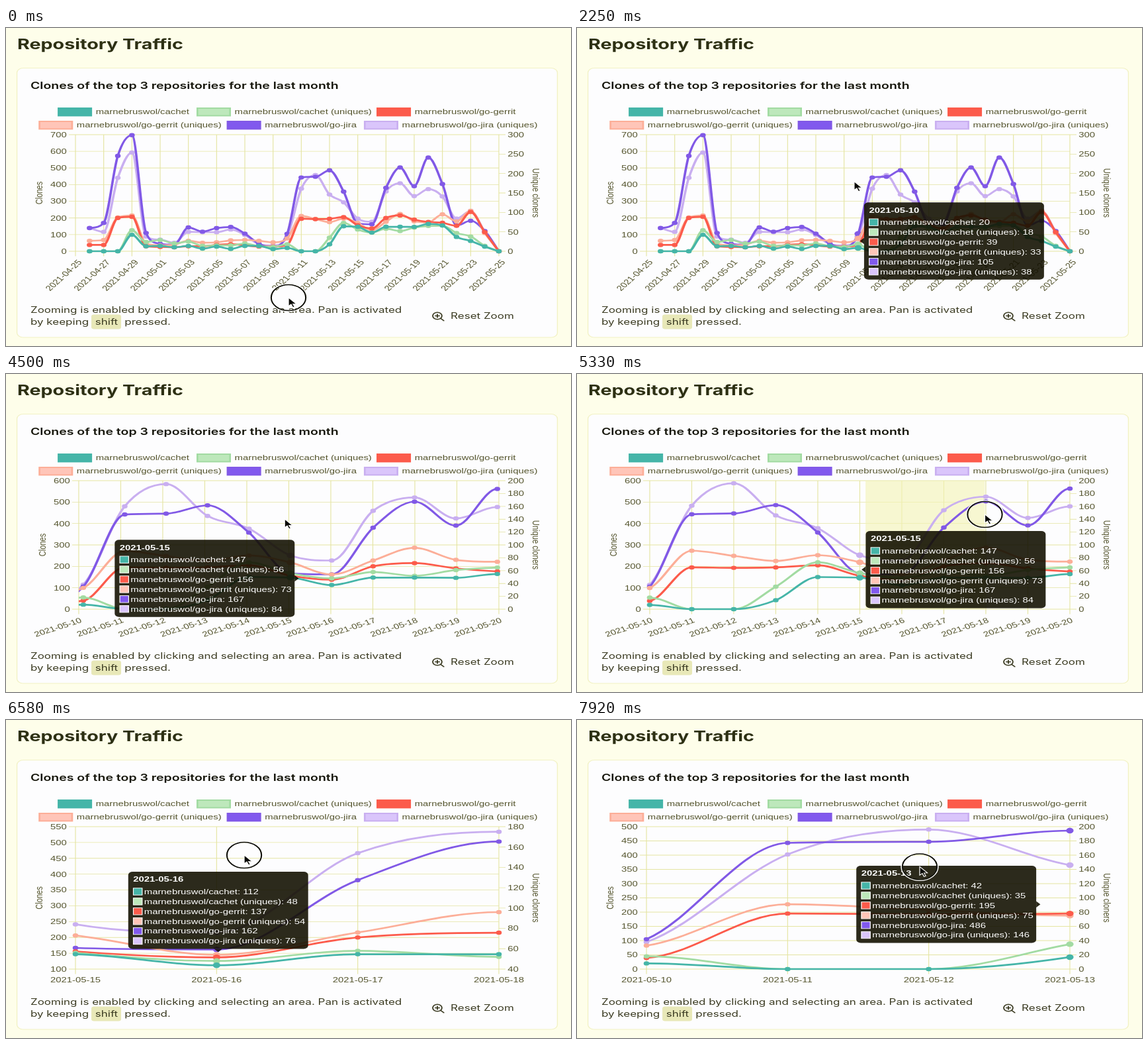
Animation of 854x480 px, one loop 8 s. Source, as an HTML page:

```html
<!DOCTYPE html>
<html lang="en">
<head>
<meta charset="utf-8">
<title>Repository Traffic</title>
<style>
  html, body { margin: 0; width: 100%; height: 100%; overflow: hidden; background: #fefeea; }
  svg { display: block; width: 100vw; height: 100vh; }
  text { white-space: pre; }
  .ui { font-family: Inter, sans-serif; font-size: 12.75px; fill: #3b3b22; }
  .ui .title { font-size: 21.5px; font-weight: 700; fill: #2d3014; }
  .ui .head { font-size: 14.6px; font-weight: 600; fill: #15150a; }
  .chart { font-family: "Liberation Sans", Arial, sans-serif; font-size: 11.15px; fill: #55552e; }
  .grid { stroke: #e5e5a2; stroke-width: .85; fill: none; }
  .tip { fill: #fff; }
</style>
</head>
<body>
<!-- The whole scene is 4:3 and shown on a wider stage. -->
<svg viewBox="0 0 640 480" preserveAspectRatio="none">
  <defs><clipPath id="area"><rect id="clip"/></clipPath></defs>
  <rect width="640" height="480" fill="#fefeea"/>
  <rect x="12.4" y="60.5" width="612.2" height="406.5" rx="7" fill="#fdfdfe" stroke="#f2f2c4"/>
  <g class="ui">
    <text class="title" x="12.7" y="32">Repository Traffic</text>
    <text class="head" x="27.7" y="92">Clones of the top 3 repositories for the last month</text>
    <text x="27.7" y="430">Zooming is enabled by clicking and selecting an area. Pan is activated</text>
    <text x="27.7" y="448">by keeping</text>
    <rect x="96.7" y="432.5" width="33.7" height="22" rx="3" fill="#e8e8b8"/>
    <text x="101" y="448">shift</text>
    <text x="134.4" y="448">pressed.</text>
    <text x="503.7" y="439">Reset Zoom</text>
    <g fill="none" stroke="#3b3b22" stroke-width="1.4" stroke-linecap="round">
      <circle cx="488.6" cy="434.5" r="5.2"/>
      <path d="M492.5 438.4l3.4 3.4M486.2 434.5h4.8M488.6 432.1v4.8"/>
    </g>
  </g>
  <g id="legend" class="chart"></g>
  <g id="chart" class="chart"></g>
  <g id="pointer"></g>
</svg>
<script>
const $ = id => document.getElementById(id);
const LOOP = 8000, FPS = 12, TOP = 161, RIGHT = 558.3, TIP_W = 203.8, TIP_H = 116.5;
const OWNER = 'marnebruswol/';

// Daily values, 26 April to 24 May; the last day is always 0.
const cachet = [0, 0, 0, 99, 30, 32, 24, 32, 16, 28, 14, 32, 32, 13, 20, 0, 0, 42, 150, 147, 112, 147, 147, 146, 164, 155, 86, 62, 28];
const cachetU = [0, 0, 0, 54, 24, 29, 20, 25, 14, 15, 15, 20, 13, 11, 18, 0, 0, 35, 73, 56, 48, 58, 52, 61, 65, 66, 47, 38, 14];
const gerrit = [38, 38, 200, 207, 30, 26, 24, 30, 30, 38, 42, 36, 28, 28, 39, 195, 193, 195, 205, 156, 137, 200, 215, 190, 176, 171, 153, 236, 115];
const gerritU = [27, 29, 87, 92, 20, 15, 17, 27, 22, 23, 28, 29, 27, 23, 33, 91, 83, 75, 84, 73, 54, 76, 96, 77, 74, 95, 77, 104, 47];
const jira = [139, 170, 573, 697, 110, 45, 40, 143, 118, 139, 146, 106, 45, 24, 105, 443, 447, 486, 358, 167, 162, 381, 503, 391, 563, 404, 155, 183, 122];
const jiraU = [60, 50, 189, 254, 38, 30, 22, 50, 49, 49, 56, 42, 18, 15, 38, 161, 196, 146, 126, 84, 76, 154, 175, 142, 160, 141, 84, 104, 50];

const makeSeries = (name, data, unique, color, fill, x, y) =>
  ({ name: OWNER + name, values: [null, ...data, 0], axis: unique ? 'r' : 'l', color, fill, x, y });
const series = [
  makeSeries('cachet', cachet, false, '#45b5a8', '#45b5a8', 58.5, 120),
  makeSeries('cachet (uniques)', cachetU, true, '#a2dba2', '#bde8bb', 215.8, 120),
  makeSeries('go-gerrit', gerrit, false, '#fc5b4b', '#fc5b4b', 419.7, 120),
  makeSeries('go-gerrit (uniques)', gerritU, true, '#fcae98', '#ffc5b8', 36.9, 140),
  makeSeries('go-jira', jira, false, '#8159e6', '#8159ee', 250, 140),
  makeSeries('go-jira (uniques)', jiraU, true, '#c9aff0', '#dac5fb', 405.4, 140)
];

const clamp = p => Math.min(1, Math.max(0, p));
const mix = (a, b, p) => a + (b - a) * p;
const outQuart = p => 1 - (1 - clamp(p)) ** 4;
const smooth = p => p * p * (3 - 2 * p);
const day = i => new Date(Date.UTC(2021, 3, 25 + i)).toISOString().slice(0, 10);
const text = (x, y, s, extra = '') => `<text x="${x}" y="${y}" ${extra}>${s}</text>`;
const END = 'text-anchor="end"', MID = 'text-anchor="middle"';

function niceScale(values) {
  const lo = Math.min(...values), hi = Math.max(...values);
  const raw = (hi - lo) / 10, base = 10 ** Math.floor(Math.log10(raw));
  const step = base * [1, 2, 5, 10].find(m => m * base >= raw);
  return { lo: Math.floor(lo / step) * step, hi: Math.ceil(hi / step) * step, step };
}

function makeView([start, a, b, animated]) {
  const n = b - a, rot = n > 10 ? 50 : n > 3 ? 23 : 0;
  const left = rot === 23 ? 82.4 : 78.7, bottom = { 0: 376, 23: 355, 50: 337 }[rot];
  const scaleFor = axis => niceScale(series.filter(s => s.axis === axis)
    .flatMap(s => s.values.slice(a, b + 1)).filter(v => v !== null));
  const axes = { l: scaleFor('l'), r: scaleFor('r') };
  const x = i => mix(left, RIGHT, (i - a) / n);
  const y = (v, axis) => mix(bottom, TOP, (v - axes[axis].lo) / (axes[axis].hi - axes[axis].lo));
  return { start, a, b, animated, rot, left, bottom, axes, x, y };
}

// Start time, first day, last day, animated change.
const views = [
  [0, 0, 30, false], [3885, 15, 25, true], [5500, 20, 23, true], [6900, 19, 22, false],
  [7120, 18, 21, false], [7290, 17, 20, false], [7480, 16, 19, false], [7785, 15, 18, false]
].map(makeView);

// Time, hovered day, vertical shift.
const hovers = [
  [800, 14], [1900, 15], [3960, 23], [4080, 22], [4200, 21], [4300, 20, 14], [4660, 20], [4780, 20],
  [5560, 22], [6345, 21], [6900, 21], [6990, 20], [7120, 20], [7210, 19], [7290, 19], [7480, 19],
  [7570, 18], [7785, 18]
];

const moves = [
  [0, 320, 407], [300, 320, 407], [1050, 313, 226], [1900, 313, 227], [2300, 314, 232], [2500, 314, 232],
  [3860, 476, 229], [3885, 476, 229], [4480, 315.5, 219], [4780, 326.8, 217], [5320, 462, 212],
  [5900, 462, 212], [6500, 269.8, 204], [6600, 269.8, 204], [7920, 388.2, 221.5], [LOOP, 388.2, 221.5]
];
// Start, end, selects an area.
const presses = [[0, 200], [2300, 3885, true], [4780, 5500, true], [6480, LOOP]];

const viewIndex = t => views.findLastIndex(v => v.start <= t);

function pointAt(s, i, t) {
  const k = viewIndex(t), v = views[k];
  const x = v.x(i), y = v.y(s.values[i], s.axis);
  if (!v.animated) return { x, y };
  const p = outQuart((t - v.start) / 1000), old = views[k - 1];
  return { x: mix(old.x(i), x, p), y: mix(old.y(s.values[i], s.axis), y, p) };
}

function cursorAt(t) {
  const k = Math.min(moves.findLastIndex(m => m[0] <= t), moves.length - 2);
  const [t0, x0, y0] = moves[k], [t1, x1, y1] = moves[k + 1];
  const p = smooth(clamp((t - t0) / (t1 - t0)));
  return { x: mix(x0, x1, p), y: mix(y0, y1, p) };
}

// Monotone cubic curve through the points.
function curve(pts) {
  const d = pts.slice(1).map((p, i) => (p.y - pts[i].y) / (p.x - pts[i].x));
  const m = pts.map((_, i) => i === 0 ? d[0] : i === d.length ? d[i - 1]
    : d[i - 1] * d[i] <= 0 ? 0 : (d[i - 1] + d[i]) / 2);
  d.forEach((slope, i) => {
    if (!slope) { m[i] = m[i + 1] = 0; return; }
    const len = Math.hypot(m[i] / slope, m[i + 1] / slope);
    if (len > 3) { m[i] *= 3 / len; m[i + 1] *= 3 / len; }
  });
  const f = n => n.toFixed(2);
  return pts.reduce((path, p, i) => {
    if (!i) return `M${f(p.x)} ${f(p.y)}`;
    const q = pts[i - 1], h = (p.x - q.x) / 3;
    return path + `C${f(q.x + h)} ${f(q.y + m[i - 1] * h)} ${f(p.x - h)} ${f(p.y - m[i] * h)} ${f(p.x)} ${f(p.y)}`;
  }, '');
}

function drawAxes(v) {
  const { left, bottom, axes, rot } = v, middle = (TOP + bottom) / 2;
  let grid = '', labels = '';
  for (let n = axes.l.lo; n <= axes.l.hi; n += axes.l.step) {
    const y = v.y(n, 'l');
    grid += `M${left - 7.5} ${y}H${RIGHT}`;
    labels += text(left - 9.9, y + 3.9, n, END);
  }
  for (let n = axes.r.lo; n <= axes.r.hi; n += axes.r.step) {
    const y = v.y(n, 'r');
    grid += `M${RIGHT} ${y}h7.5`;
    labels += text(RIGHT + 9.9, y + 3.9, n);
  }
  for (let i = v.a; i <= v.b; i += v.b - v.a > 20 ? 2 : 1) {
    const x = v.x(i);
    grid += `M${x} ${TOP}V${bottom + 7.5}`;
    labels += `<g transform="translate(${x} ${bottom + 10.3}) rotate(${-rot})">`
      + text(0, 10.2, day(i), rot ? END : MID) + '</g>';
  }
  const side = (x, angle, s) =>
    `<g transform="translate(${x} ${middle}) rotate(${angle})">${text(0, 3.9, s, MID)}</g>`;
  return `<path class="grid" d="${grid}"/>` + labels
    + side(left - 41.3, -90, 'Clones') + side(600.3, 90, 'Unique cloners');
}

function drawLines(v, t, active) {
  return series.map(s => {
    const pts = s.values.map((n, i) => n === null ? null : { ...pointAt(s, i, t), i }).filter(Boolean);
    const dots = pts.filter(p => p.x > v.left - .5 && p.x < RIGHT + .5 && p.y > TOP - .5 && p.y < v.bottom + .5)
      .map(p => `<circle cx="${p.x}" cy="${p.y}" r="${p.i === active ? 4.2 : 3.2}"/>`).join('');
    return `<path d="${curve(pts)}" fill="none" stroke="${s.color}" stroke-width="2.7" clip-path="url(#area)"/>`
      + `<g fill="${s.color}">${dots}</g>`;
  }).reverse().join('');
}

function tipTarget([t, i, shift = 0]) {
  const pts = series.map(s => pointAt(s, i, t));
  const x = pts[0].x, y = pts.reduce((sum, p) => sum + p.y, 0) / pts.length + shift;
  if (y > 342) return { side: 'bottom', x: x - TIP_W / 2, y: y - TIP_H - 6.5 };
  const side = x <= 321.2 ? 'left' : 'right';
  return { side, x: side === 'left' ? x + 6.7 : x - 6.7 - TIP_W, y: y - TIP_H / 2 };
}

function drawTip(t) {
  const past = hovers.filter(h => h[0] <= t);
  if (!past.length) return '';
  let box = null;
  past.forEach((h, k) => {
    const goal = tipTarget(h), until = past[k + 1] ? past[k + 1][0] : t;
    const p = box ? outQuart((until - h[0]) / 400) : 1;
    const from = box || goal;
    box = { side: goal.side, x: mix(from.x, goal.x, p), y: mix(from.y, goal.y, p) };
  });
  const i = past[past.length - 1][1], cy = TIP_H / 2, cx = TIP_W / 2;
  const caret = {
    left: `M0 ${cy - 4.7}L-4.7 ${cy}L0 ${cy + 4.7}z`,
    right: `M${TIP_W} ${cy - 4.7}l4.7 4.7l-4.7 4.7z`,
    bottom: `M${cx - 4.7} ${TIP_H}h9.4l-4.7 4.7z`
  }[box.side];
  const rows = series.map((s, k) => {
    const y = 30 + 14.9 * k;
    return `<rect x="5.8" y="${y - 5.2}" width="10" height="10.4" fill="${s.fill}" stroke="#fff" stroke-width=".9"/>`
      + text(18, y + 3.9, `${s.name}: ${s.values[i]}`);
  }).join('');
  return `<g class="tip" transform="translate(${box.x} ${box.y})" opacity="${clamp((t - hovers[0][0]) / 200)}">`
    + `<g fill="#121000" fill-opacity=".89"><rect width="${TIP_W}" height="${TIP_H}" rx="5"/><path d="${caret}"/></g>`
    + text(5.6, 15.4, day(i), 'font-weight="700"') + rows + '</g>';
}

function drawSelection(v, press, cursor) {
  if (!press || !press[2]) return '';
  const x = cursorAt(press[0]).x;
  return `<rect x="${x}" y="${TOP}" width="${Math.max(0, cursor.x - x)}" height="${v.bottom - TOP}" fill="#f3f3b4" fill-opacity=".6"/>`;
}

function drawPointer(cursor, press) {
  const ring = press ? '<circle r="20.3" fill="none" stroke="#fff" stroke-width="2.4"/>'
    + '<circle r="19.6" fill="none" stroke="#0c0c04" stroke-width="1.5"/>' : '';
  return `<g transform="translate(${cursor.x} ${cursor.y})">${ring}`
    + '<path d="M0 0V12.8L2.9 10.1L4.9 14.8L6.9 13.9L4.9 9.4H8.8z" fill="#080804" stroke="#fff" stroke-width=".9"/></g>';
}

function draw(t) {
  const v = views[viewIndex(t)], cursor = cursorAt(t);
  const press = presses.find(p => t >= p[0] && t < p[1]);
  const hover = hovers.findLast(h => h[0] <= t);
  const clip = { x: v.left, y: TOP - 1.4, width: RIGHT - v.left, height: v.bottom - TOP + 2.8 };
  for (const key in clip) $('clip').setAttribute(key, clip[key]);
  $('chart').innerHTML = drawAxes(v) + drawSelection(v, press, cursor)
    + drawLines(v, t, hover && hover[1]) + drawTip(t);
  $('pointer').innerHTML = drawPointer(cursor, press);
}

$('legend').innerHTML = series.map(s =>
  `<rect x="${s.x + 1}" y="${s.y + 1}" width="37" height="11.4" fill="${s.fill}" stroke="${s.color}" stroke-width="2"/>`
  + text(s.x + 43.2, s.y + 10.3, s.name)).join('');

// The picture advances in steps of one twelfth of a second.
let shown = -1;
const begin = performance.now();
function tick(now) {
  const step = Math.floor((Math.max(0, now - begin) % LOOP + 5) * FPS / 1000) % (LOOP * FPS / 1000);
  if (step !== shown) draw((shown = step) * 1000 / FPS);
  requestAnimationFrame(tick);
}
tick(begin);
</script>
</body>
</html>
```
